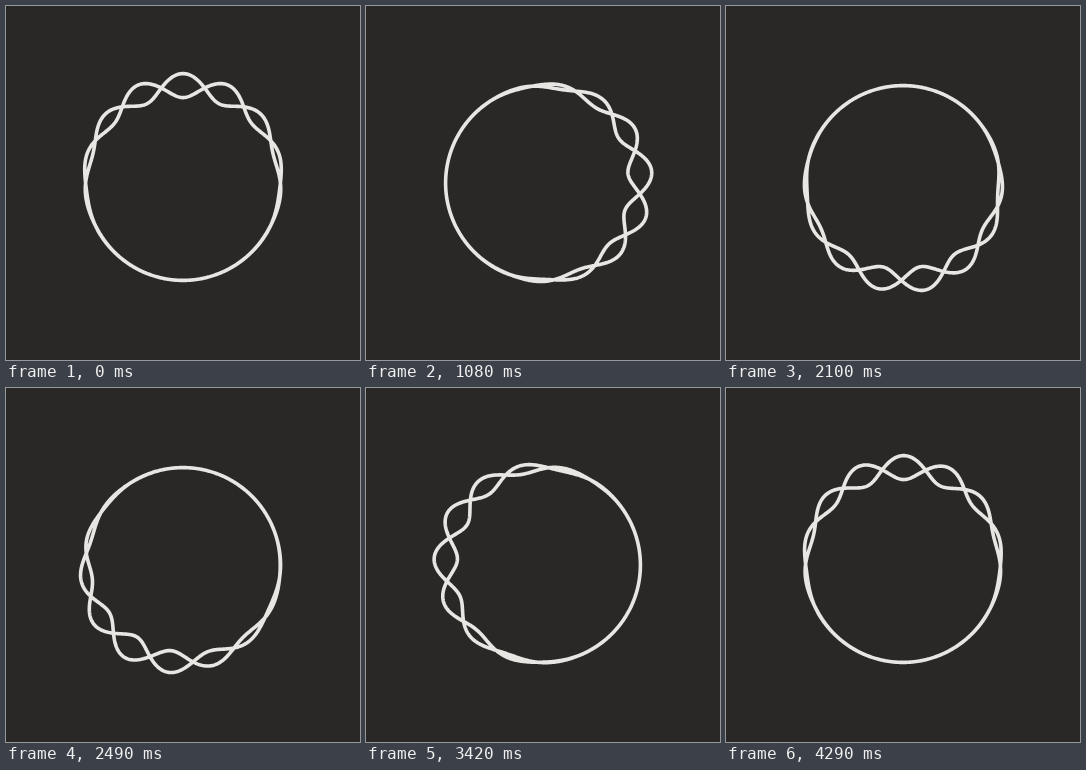
These frames come from a looping animation (354 px wide and 354 px high, 4.32 s). An HTML page with a canvas:

```html
<!DOCTYPE html>
<html lang="en">
<head>
<meta charset="utf-8">
<title>Braided ring</title>
<style>
  html, body { margin: 0; width: 100%; height: 100%; overflow: hidden; background: #292827; }
  canvas { display: block; width: 354px; height: 354px; }
</style>
</head>
<body>
<canvas id="stage"></canvas>
<script>
const SIZE = 354, LOOP = 4320, STEP = 30;
const CENTER = 177, RADIUS = 97.4, SWING = 12, WAVES = 7;
const TAU = Math.PI * 2, POINTS = 720;

const canvas = document.getElementById('stage');
const ctx = canvas.getContext('2d');
const scale = window.devicePixelRatio || 1;
canvas.width = canvas.height = Math.round(SIZE * scale);
ctx.scale(scale, scale);

// Angles run clockwise from the top.
function addStrand(side, t) {
  for (let i = 0; i < POINTS; i++) {
    const a = TAU * i / POINTS;
    const swell = ((1 + Math.cos(a - TAU * t)) / 2) ** 3;
    // The waves drift backwards while the swell goes round once.
    const wave = Math.cos(WAVES * a + 1.5 * TAU * t);
    const r = RADIUS + side * SWING * swell * wave;
    const x = CENTER + r * Math.sin(a), y = CENTER - r * Math.cos(a);
    if (i) ctx.lineTo(x, y);
    else ctx.moveTo(x, y);
  }
  ctx.closePath();
}

function draw(now) {
  const t = Math.floor((now % LOOP) / STEP) * STEP / LOOP;
  ctx.fillStyle = '#292827';
  ctx.fillRect(0, 0, SIZE, SIZE);
  ctx.strokeStyle = '#e8e6e2';
  ctx.lineWidth = 3.6;
  ctx.lineJoin = 'round';
  // One path for both strands keeps the edges soft where they overlap.
  ctx.beginPath();
  addStrand(1, t);
  addStrand(-1, t);
  ctx.stroke();
}

let start;
function tick(now) {
  if (start === undefined) start = now;
  draw(now - start);
  requestAnimationFrame(tick);
}
draw(0);
requestAnimationFrame(tick);
</script>
</body>
</html>
```
